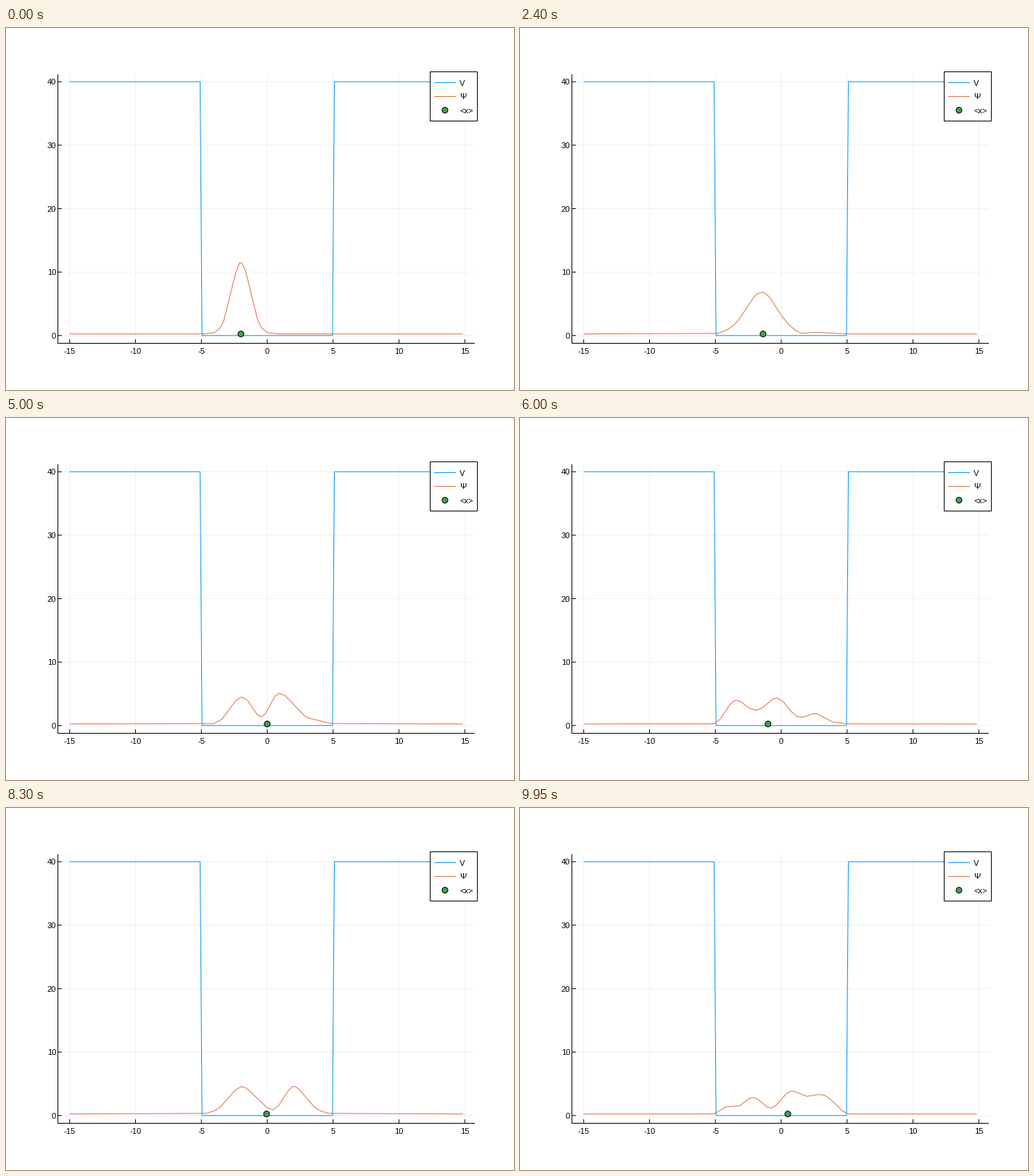
A matplotlib script that plays this animation: 700 by 500 pixels, repeating every 10000 ms.

```python
import numpy as np
import matplotlib.pyplot as plt
from matplotlib.animation import FuncAnimation
from matplotlib.patches import Circle, Rectangle

W, H, DPI = 700, 500, 100
FRAMES, INTERVAL = 200, 50
PX = 72 / DPI  # one pixel in points
BLUE, ORANGE, GREEN = "#009afa", "#e26f46", "#3da44d"
GRID = "#f0f0f0"

# Wave packet at rest in a finite square well (hbar = m = 1)
N, X_MIN, X_MAX = 200, -15.0, 15.0
T_END = 1500.0
DX = (X_MAX - X_MIN) / N
x = X_MIN + DX * np.arange(N)
k = 2 * np.pi * np.fft.fftfreq(N, DX)
V = np.where(np.abs(x) > 5, 40.0, 0.0)
kinetic = np.fft.ifft(k[:, None] ** 2 / 2 * np.fft.fft(np.eye(N), axis=0), axis=0).real
hamiltonian = (kinetic + kinetic.T) / 2 + np.diag(V)
levels, states = np.linalg.eigh(hamiltonian)

psi0 = np.pi ** -0.25 * np.exp(-(x + 2) ** 2 / 2)
psi0 /= np.sqrt(np.sum(psi0 ** 2) * DX)
coeffs = states.T @ psi0
energy = np.sum(levels * coeffs ** 2) * DX


def density(t):
    psi = states @ (np.exp(-1j * levels * t) * coeffs)
    return np.abs(psi) ** 2


def to_px(u):
    return 360.0 + 18.15 * np.asarray(u)


def to_py(v):
    return 424.8 - 8.765 * np.asarray(v)


def simplify(px, py, tol=1.0):
    """Drop points that lie within tol pixels of the chord."""
    keep = {0, len(px) - 1}
    stack = [(0, len(px) - 1)]
    while stack:
        a, b = stack.pop()
        if b - a < 2:
            continue
        ux, uy = px[b] - px[a], py[b] - py[a]
        gap = np.abs(ux * (py[a + 1:b] - py[a]) - uy * (px[a + 1:b] - px[a]))
        gap /= np.hypot(ux, uy)
        i = int(np.argmax(gap))
        if gap[i] > tol:
            mid = a + 1 + i
            keep.add(mid)
            stack += [(a, mid), (mid, b)]
    idx = sorted(keep)
    return px[idx], py[idx]


plt.rcParams["font.family"] = "Liberation Sans"
fig = plt.figure(figsize=(W / DPI, H / DPI), dpi=DPI, facecolor="white")
ax = fig.add_axes([0, 0, 1, 1])
ax.set_xlim(0, W)
ax.set_ylim(H, 0)
ax.axis("off")


def line(xs, ys, color, z):
    return ax.plot(xs, ys, color=color, lw=PX, zorder=z, snap=False,
                   solid_capstyle="butt", solid_joinstyle="round")[0]


def dot(px, py, z):
    return ax.add_patch(Circle((px, py), 4, fc=GREEN, ec="black", lw=PX,
                               zorder=z, snap=False))


def label(px, py, text, align, z=5):
    ax.text(px, py, text, fontsize=8, ha=align, va="baseline", zorder=z)


LEFT, RIGHT, TOP, BOTTOM = 71.5, 646, 64, 435.5

for value in range(-15, 16, 5):
    px = float(to_px(value))
    line([px, px], [TOP, BOTTOM], GRID, 1)
    line([px, px], [BOTTOM, BOTTOM - 5.5], "black", 2)
    label(px, 450, str(value), "center")

for value in range(0, 41, 10):
    py = float(to_py(value))
    line([LEFT, RIGHT], [py, py], GRID, 1)
    line([LEFT, LEFT + 5.5], [py, py], "black", 2)
    label(69, py + 4, str(value), "right")

line([LEFT, LEFT], [TOP, BOTTOM + 0.5], "black", 2)
line([LEFT - 0.5, RIGHT], [BOTTOM, BOTTOM], "black", 2)

x_px = to_px(x)
line(x_px, to_py(V), BLUE, 3)
wave = line([], [], ORANGE, 4)
mean = dot(0, 0, 5)

# Legend
ax.add_patch(Rectangle((584.5, 60.5), 65, 68, fc="white", ec="black", lw=PX,
                       zorder=6, snap=False))
line([590, 620], [75.5, 75.5], BLUE, 7)
line([590, 620], [94.5, 94.5], ORANGE, 7)
dot(604.9, 113.5, 7)
for py, text in ((80, "V"), (98, "Ψ"), (118, "<x>")):
    label(625, py, text, "left", 7)


def update(frame):
    rho = density(T_END * frame / (FRAMES - 1))
    wave.set_data(*simplify(x_px, to_py(20 * rho + energy)))
    centre = np.sum(x * rho) / np.sum(rho)
    mean.center = float(to_px(centre)), float(to_py(energy))
    return wave, mean


anim = FuncAnimation(fig, update, frames=FRAMES, interval=INTERVAL,
                     repeat=True, repeat_delay=0, blit=False)
plt.show()
```
